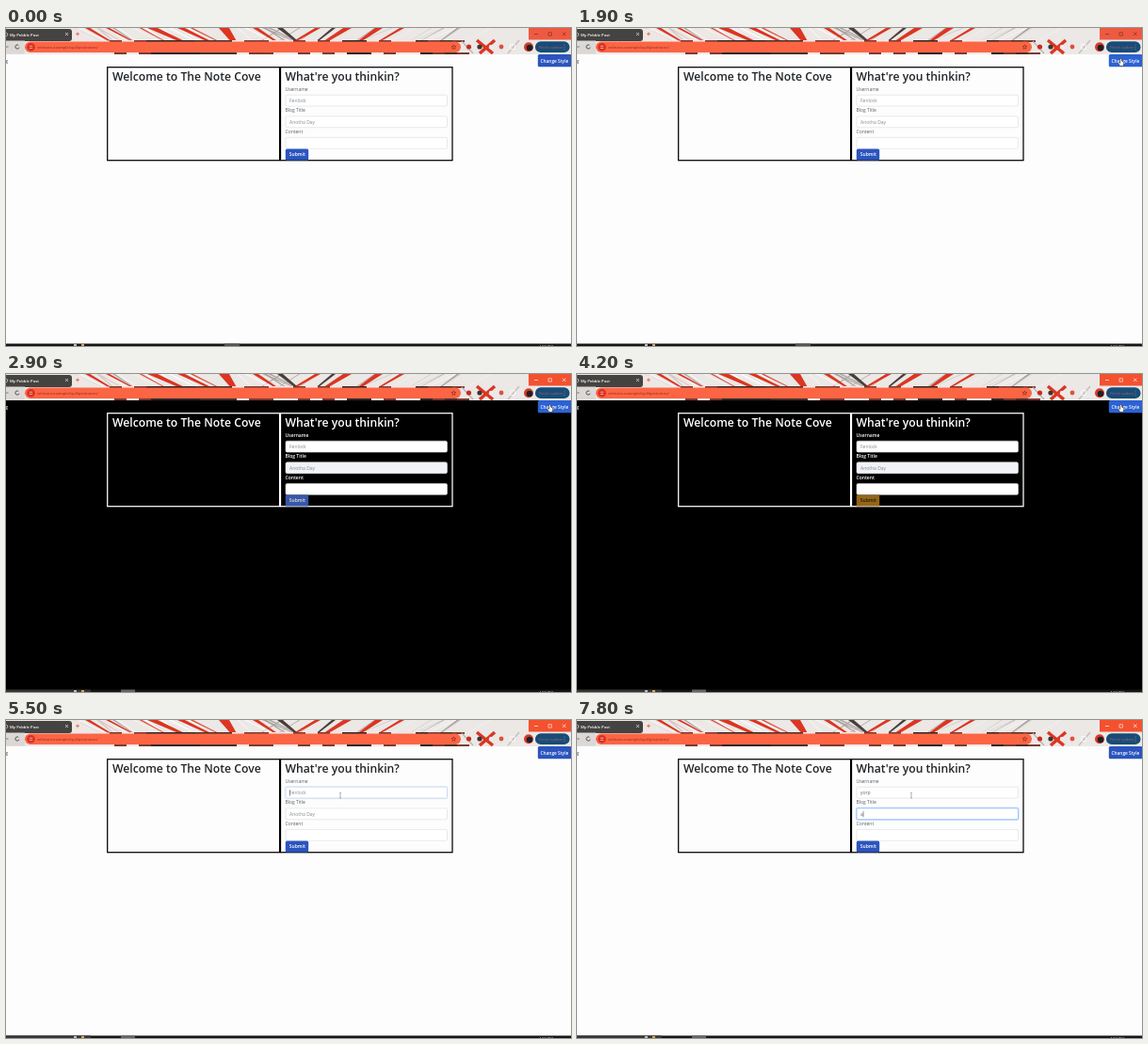
Animation of 600 by 338 pixels, one loop 8000 ms. Source, as an HTML page with a canvas:

```html
<!DOCTYPE html>
<html lang="en">
<head>
<meta charset="utf-8">
<title>Blog form</title>
<style>
html, body { margin: 0; width: 100%; height: 100%; overflow: hidden; background: #fff; }
canvas { display: block; width: 600px; height: 338px; }
</style>
</head>
<body>
<canvas id="stage"></canvas>
<script>
const W = 600, H = 338, LOOP = 8000;
const DARK_ON = 2880, DARK_OFF = 4210, FADE = 150;
const canvas = document.getElementById('stage');
const ratio = window.devicePixelRatio || 1;
canvas.width = W * ratio;
canvas.height = H * ratio;
const ctx = canvas.getContext('2d');
ctx.scale(ratio, ratio);

const RED = '#dc3521', ORANGE = '#fc6544', BLUE = [43, 84, 190], BROWN = [148, 101, 25];
const clamp = v => Math.max(0, Math.min(1, v));
const lerp = (a, b, u) => a + (b - a) * u;
const easeOut = (u, power) => 1 - (1 - clamp(u)) ** power;
const fade = (t, from) => clamp((t - from) / FADE);
const mix = (a, b, u) => `rgb(${a.map((v, i) => Math.round(lerp(v, b[i], u)))})`;

function rect(x, y, w, h, fill) {
  ctx.fillStyle = fill;
  ctx.fillRect(x, y, w, h);
}

function round(x, y, w, h, r, fill, stroke, line = 0.6) {
  ctx.beginPath();
  ctx.roundRect(x, y, w, h, r);
  if (fill) { ctx.fillStyle = fill; ctx.fill(); }
  if (stroke) { ctx.strokeStyle = stroke; ctx.lineWidth = line; ctx.stroke(); }
}

function dot(x, y, r, fill) {
  ctx.beginPath();
  ctx.arc(x, y, r, 0, Math.PI * 2);
  ctx.fillStyle = fill;
  ctx.fill();
}

function poly(points, fill, stroke) {
  ctx.beginPath();
  points.forEach(([x, y]) => ctx.lineTo(x, y));
  ctx.closePath();
  if (fill) { ctx.fillStyle = fill; ctx.fill(); }
  if (stroke) { ctx.strokeStyle = stroke; ctx.lineWidth = 0.6; ctx.stroke(); }
}

function stroke(points, color, width = 0.7) {
  ctx.beginPath();
  points.forEach(([x, y], i) => i ? ctx.lineTo(x, y) : ctx.moveTo(x, y));
  ctx.strokeStyle = color;
  ctx.lineWidth = width;
  ctx.stroke();
}

function text(value, x, y, size, color, weight = 400) {
  ctx.font = `${weight} ${size}px "Open Sans", "Noto Sans", sans-serif`;
  ctx.fillStyle = color;
  ctx.fillText(value, x, y);
  return ctx.measureText(value).width;
}

function seeded(seed) {
  return () => (seed = (seed * 16807) % 2147483647) / 2147483647;
}

function slash(top, lean, width, color) {
  poly([[top, 0], [top + width, 0], [top + lean + width * 0.6, 13.5], [top + lean, 13.5]], color);
}

function drawTheme() {
  rect(0, 0, W, 28, '#ebe8e6');
  const random = seeded(417);
  const tones = ['#fff', '#d2cdca', '#e0503c', '#f6f3f2', '#aaa3a0'];
  for (let i = 0; i < 40; i++) {
    const x = 70 + random() * 470;
    const lean = (x < 290 ? 1 : -1) * (14 + random() * 18);
    slash(x, lean, 0.6 + random() * 3, tones[Math.floor(random() * tones.length)]);
  }
  [[84, 24, 5], [106, 26, 4], [150, 32, 11], [182, 30, 8], [226, 12, 11], [262, 22, 6]]
    .forEach(([x, lean, w]) => slash(x, lean, w, RED));
  [[328, -22, 6], [358, -20, 9], [392, -18, 8], [418, -22, 5]]
    .forEach(([x, lean, w]) => slash(x, lean, w, RED));
  slash(288, 18, 6, '#4a3e3b');
  slash(346, -16, 4, '#4a3e3b');

  // Scraps of the wallpaper show above and below the address bar.
  for (let x = 110; x < 480; x += 13) {
    const tone = ['#4a302b', '#7d3a30', '#efe9e7', '#2f2826'][Math.floor(random() * 4)];
    rect(x, 13, 13, 2, tone);
    rect(x + 5, 26, 13, 2, tone);
  }
  stroke([[500, 13], [517, 27]], RED, 3.5);
  stroke([[519, 13], [503, 27]], RED, 3.5);
  stroke([[484, 14], [496, 27]], '#b9b2af', 1.2);
  stroke([[545, 13], [533, 27]], '#c7c0bd', 1.5);
}

function drawBrowser(active) {
  drawTheme();

  round(-4, 1, 74, 13, 3, '#454342');
  text('My Pebble Post', 4, 8.6, 4.2, '#fff', 600);
  ctx.beginPath();
  ctx.arc(0, 7, 1.8, -1.4, 1.4);
  ctx.strokeStyle = '#ddd';
  ctx.lineWidth = 0.8;
  ctx.stroke();
  stroke([[63, 5], [66, 8]], '#eee');
  stroke([[66, 5], [63, 8]], '#eee');
  dot(76, 6.3, 4.6, '#f6e4df');
  stroke([[74, 6.3], [78, 6.3]], '#a8564a');
  stroke([[76, 4.3], [76, 8.3]], '#a8564a');

  rect(555, 0, 45, 12.5, active ? '#f4512f' : '#ee5a41');
  const icon = active ? '#fff' : '#7d2a1f';
  stroke([[561, 6.5], [565, 6.5]], icon);
  round(576, 4.7, 3.4, 3.4, 0, null, icon);
  stroke([[591, 4.5], [594.5, 8]], icon);
  stroke([[594.5, 4.5], [591, 8]], icon);

  rect(0, 13.5, 20, 14, '#dcd8d6');
  stroke([[0, 20], [2.5, 20]], '#555');
  ctx.beginPath();
  ctx.arc(12, 20, 2.1, 0.3, 5.4);
  ctx.strokeStyle = '#333';
  ctx.lineWidth = 0.8;
  ctx.stroke();

  round(20, 14.5, 463, 11.5, 5.7, ORANGE);
  dot(26.5, 20.3, 4.3, '#d92f22');
  stroke([[24.8, 19.2], [28.2, 19.2]], '#fff', 0.6);
  stroke([[24.8, 21.4], [28.2, 21.4]], '#fff', 0.6);
  text('velmarn.example/quillpostnotes/', 33, 21.9, 4.2, '#8e2c1c');
  const star = Array.from({ length: 10 }, (_, i) => {
    const a = i * Math.PI / 5 - Math.PI / 2, r = i % 2 ? 1.1 : 2.5;
    return [475.5 + Math.cos(a) * r, 20.3 + Math.sin(a) * r];
  });
  poly(star, null, '#70291d');

  dot(491.5, 20, 2.6, '#c92a20');
  dot(503, 20, 2.6, '#3d3432');
  dot(515, 20, 2.2, '#f0ecea');
  dot(526, 20, 2.4, '#e0503c');
  round(535.5, 17.5, 5, 5, 1, null, '#fff', 0.8);
  dot(555, 20.2, 5, '#d93a27');
  dot(556, 21, 3.3, '#1d2027');
  round(562, 14.3, 36.5, 11.8, 5.9, '#174d78');
  text('Finish update', 566, 21.9, 4, '#b4576a');
  [18, 20.2, 22.4].forEach(y => dot(593, y, 0.5, '#d57468'));
}

function drawTaskbar(active) {
  rect(0, 335.5, W, 2.5, '#171616');
  if (active) {
    rect(0, 335.5, 90, 2.5, '#353535');
    rect(122, 335.5, 15, 2.5, '#666');
  } else {
    rect(232, 335.5, 16, 2.5, '#555');
  }
  rect(72, 336, 3, 2, '#bbb');
  rect(80, 336, 3, 2, '#d6a64a');
  text('4:09 PM', 566, 340, 4, '#ddd');
}

function drawField(y, field, dark) {
  const ring = field.ring;
  if (ring) round(296.4, y - 0.6, 172.7, 13.1, 2, null, `rgba(13,110,253,${0.2 * ring})`, 1.2);
  const edge = mix([215, 219, 224], [134, 183, 254], ring);
  round(297, y, 171.5, 11.9, 1.6, dark && field.tint || '#fff', edge, 0.6 + ring * 0.2);
  const width = field.value ? text(field.value, 301, y + 8.1, 5, '#666') : 0;
  if (!width) text(field.hint, 301, y + 8.1, 5, '#858a8f');
  if (field.caret) rect(301 + width, y + 3, 0.5, 6.6, '#333');
}

function typed(t, word, times) {
  return word.slice(0, times.filter(at => t >= at).length);
}

function drawPage(t, dark, hover) {
  const ink = dark ? '#fff' : '#000';
  const heading = dark ? '#fff' : '#212529';
  const label = dark ? '#fff' : '#5b5f63';
  rect(0, 28, W, 308, dark ? '#000' : '#fdfdfd');
  text('g', -0.5, 36.6, 5, dark ? '#fff' : '#555');

  ctx.strokeStyle = ink;
  ctx.lineWidth = 1.25;
  ctx.strokeRect(107.7, 41.7, 182.9, 99);
  ctx.strokeRect(291.5, 41.7, 182.5, 99);

  text('Welcome to The Note Cove', 113, 55.6, 12.2, heading, 600);
  text("What're you thinkin?", 296.5, 55.6, 12.2, heading, 600);

  const fields = [
    {
      name: 'Username', hint: 'Fenlock',
      ring: fade(t, 5440) - fade(t, 6850),
      value: typed(t, 'yorp', [6300, 6400, 6600, 6700]),
      caret: t >= 5500 && t < 6900 && !(t >= 6000 && t < 6300)
    },
    {
      name: 'Blog Title', hint: 'Anotha Day', tint: '#f1f3f8',
      ring: fade(t, 6850),
      value: typed(t, 'a', [7800]),
      caret: t >= 6900 && !(t >= 7400 && t < 7800)
    },
    { name: 'Content', hint: '', ring: 0, value: '', caret: false }
  ];
  fields.forEach((field, i) => {
    const y = 71.2 + i * 22.6;
    text(field.name, 296.5, y - 4.4, 5, label, dark ? 600 : 400);
    drawField(y, field, dark);
  });

  const warm = fade(t, DARK_ON) - fade(t, DARK_OFF);
  round(296.8, 128.5, 24.4, 12, dark ? 0.5 : 1.6, mix(BLUE, BROWN, warm));
  text('Submit', 300.8, 136.4, 5, mix([255, 255, 255], [35, 25, 12], warm), 600);

  round(564.8, 28, 36, 13.3, 1.6, hover ? '#2c62d2' : mix(BLUE, BLUE, 0));
  text('Change Style', 567.5, 36.8, 4.8, '#fff', 600);
}

function pointerAt(t) {
  if (t < 700) return null;
  const glide = (a, b, u) => [lerp(a[0], b[0], u), lerp(a[1], b[1], u)];
  const entry = [57, 195], approach = [549, 64], button = [578, 36], field = [355, 80];
  if (t <= 1500) return glide(entry, approach, easeOut((t - 700) / 800, 1.5));
  if (t < 4300) return glide(approach, button, easeOut((t - 1500) / 400, 1.5));
  return glide(button, field, easeOut((t - 4300) / 1100, 3));
}

function drawPointer([x, y], hover) {
  ctx.save();
  ctx.translate(x, y);
  if (hover) {
    poly([[-1.2, -3.4], [-0.2, -3.8], [0.5, -3], [0.6, -0.8], [2.8, 0], [2.6, 2.6], [1.8, 4.4],
      [-1.2, 4.4], [-3.2, 1.4], [-2.4, 0.6], [-1.3, 1.4]], '#fff', '#222');
  } else if (x > 297 && x < 468 && y > 71 && y < 83) {
    stroke([[-1, -2.8], [1, -2.8]], '#777', 0.4);
    stroke([[0, -2.8], [0, 3]], '#555', 0.5);
    stroke([[-1, 3], [1, 3]], '#777', 0.4);
  } else {
    poly([[0, 0], [0, 6.2], [1.4, 5], [2.4, 7], [3.3, 6.6], [2.4, 4.6], [4.3, 4.5]], '#fff', '#222');
  }
  ctx.restore();
}

function draw(now) {
  const t = Math.floor((now % LOOP) / 100) * 100;
  const active = t >= DARK_ON;
  const dark = active && t < DARK_OFF;
  const pointer = pointerAt(t);
  const hover = !!pointer && pointer[0] > 565 && pointer[1] > 28 && pointer[1] < 41;
  drawPage(t, dark, hover);
  drawBrowser(active);
  drawTaskbar(active);
  if (pointer) drawPointer(pointer, hover);
}

let start;
function frame(now) {
  start ??= now;
  draw(now - start);
  requestAnimationFrame(frame);
}
draw(0);
requestAnimationFrame(frame);
</script>
</body>
</html>
```
